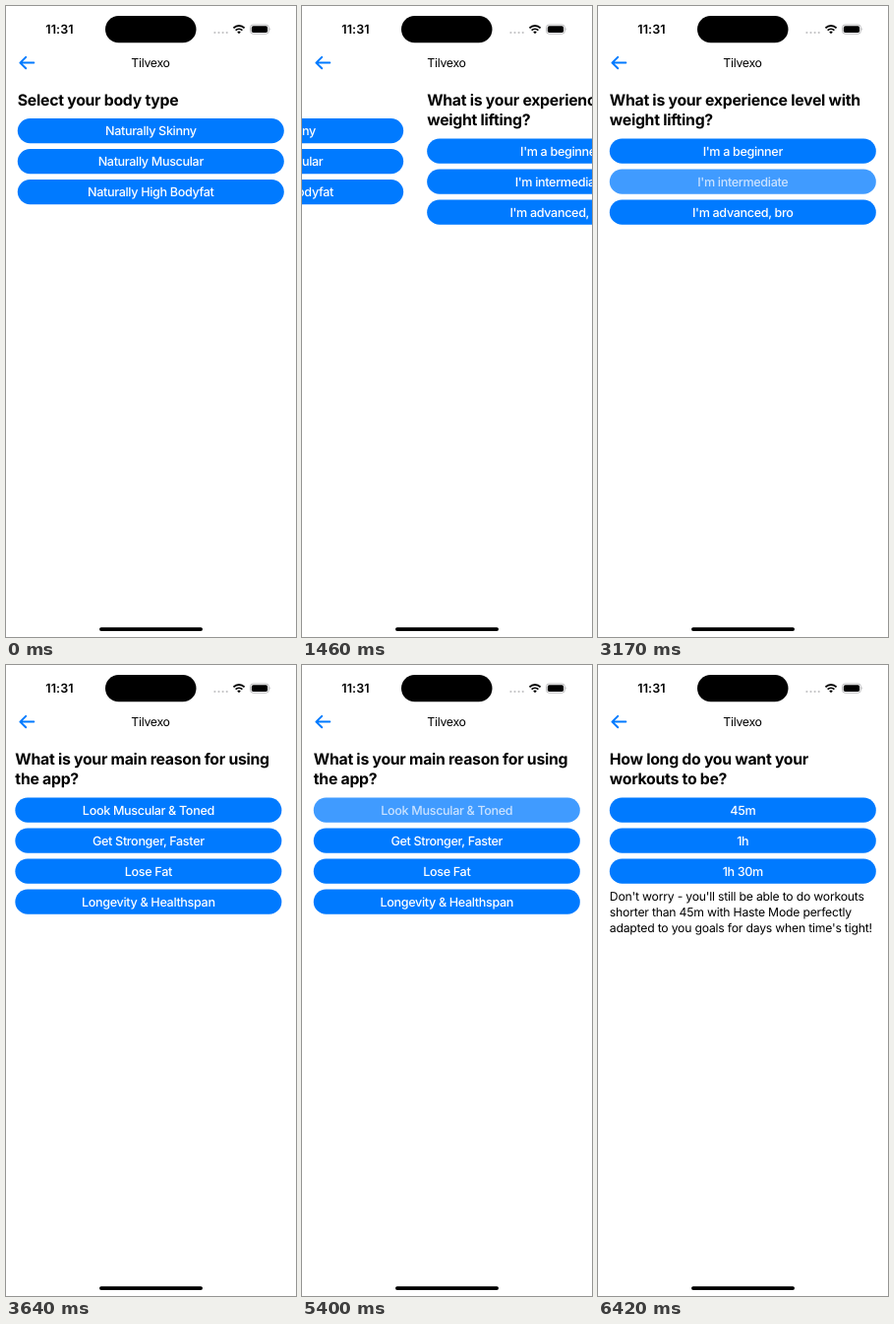
Recreate the animation shown at these times as an HTML page. Size 295 px wide and 640 px high, loop 7.29 s.

```html
<!DOCTYPE html>
<html lang="en">
<head>
<meta charset="utf-8">
<title>Workout setup</title>
<style>
  html, body { margin: 0; width: 100%; height: 100%; overflow: hidden; background: #fff; }
  svg { display: block; width: 100vw; height: 100vh; font-family: Inter, Roboto, sans-serif; text-rendering: geometricPrecision; }
  .mid { text-anchor: middle; }
  .clock { font-size: 12.6px; font-weight: 600; letter-spacing: .1px; }
  .brand { font-size: 12.3px; letter-spacing: -.28px; }
  .title { font-size: 15.8px; font-weight: 700; letter-spacing: -.27px; }
  .label { font-size: 12.6px; font-weight: 500; letter-spacing: -.34px; fill: #fff; }
  .note { font-size: 12.2px; letter-spacing: -.2px; }
  .button rect { fill: #007aff; }
  .button.down rect { fill: #409bff; }
  .button.down text { fill: #c9e2ff; }
</style>
</head>
<body>
<svg id="stage" viewBox="0 0 295 640">
  <rect width="295" height="640" fill="#fff"/>
  <g id="pages"></g>
  <text class="clock mid" x="54.5" y="28.3">11:31</text>
  <rect x="101" y="10" width="92.5" height="27.3" rx="13.65"/>
  <g fill="#c2c2c4">
    <circle cx="212.4" cy="27" r="1.1"/><circle cx="216.5" cy="27" r="1.1"/>
    <circle cx="220.6" cy="27" r="1.1"/><circle cx="224.7" cy="27" r="1.1"/>
  </g>
  <g fill="none" stroke="#000" stroke-width="1.8">
    <path d="M231.4 22.3A8 8 0 0 1 242.6 22.3"/>
    <path d="M233.6 24.7A4.9 4.9 0 0 1 240.4 24.7"/>
  </g>
  <path d="M235.2 26.3A2.6 2.6 0 0 1 238.8 26.3L237 28.2Z"/>
  <rect x="248.5" y="19" width="18.8" height="9.2" rx="2.8" fill="none" stroke="#b2b2b4" stroke-width=".9"/>
  <rect x="249.8" y="20.2" width="16.3" height="6.8" rx="1.8"/>
  <path d="M268.5 22.1Q270 23.6 268.5 25.1Z" fill="#b2b2b4"/>
  <path d="M28.3 57.6H14.6M20.2 51.9L14.4 57.6L20.2 63.3" fill="none" stroke="#007aff" stroke-width="2" stroke-linecap="round" stroke-linejoin="round"/>
  <text class="brand mid" x="147" y="62">Tilvexo</text>
  <rect x="95" y="630.2" width="105" height="3.8" rx="1.9"/>
</svg>
<script>
const W = 295, LOOP = 7290, LEFT = 11.8;

const PAGES = [
  { title: ["Select your body type"],
    options: ["Naturally Skinny", "Naturally Muscular", "Naturally High Bodyfat"] },
  { title: ["What is your experience level with", "weight lifting?"],
    options: ["I'm a beginner", "I'm intermediate", "I'm advanced, bro"] },
  { title: ["What is your main reason for using", "the app?"],
    options: ["Look Muscular & Toned", "Get Stronger, Faster", "Lose Fat", "Longevity & Healthspan"] },
  { title: ["How long do you want your", "workouts to be?"],
    options: ["45m", "1h", "1h 30m"],
    note: ["Don't worry - you'll still be able to do workouts",
           "shorter than 45m with Haste Mode perfectly",
           "adapted to you goals for days when time's tight!"] }
];

// Each tap: press time, pressed option, and the moments at which the slide is redrawn.
const TAPS = [
  { press: 1200, option: 1, steps: [1340, 1450, 1560, 1680, 1800, 1900, 2020] },
  { press: 3170, option: 1, steps: [3420, 3530, 3640, 3740, 3850, 3960, 4060] },
  { press: 5400, option: 0, steps: [5580, 5690, 5790, 5900, 6010, 6110, 6220] }
];

function add(parent, tag, attrs, text) {
  const el = document.createElementNS("http://www.w3.org/2000/svg", tag);
  for (const key in attrs) el.setAttribute(key, attrs[key]);
  if (text) el.textContent = text;
  parent.appendChild(el);
  return el;
}

function buildPage({ title, options, note = [] }) {
  const group = add(document.getElementById("pages"), "g", {});
  const top = 114 + (title.length - 1) * 20.6;
  title.forEach((line, i) => add(group, "text", { class: "title", x: LEFT, y: 100.8 + i * 20.6 }, line));
  const buttons = options.map((name, i) => {
    const y = top + i * 31;
    const button = add(group, "g", { class: "button" });
    add(button, "rect", { x: LEFT, y, width: 271, height: 25.2, rx: 12.6 });
    add(button, "text", { class: "label mid", x: LEFT + 135.5, y: y + 17.1 }, name);
    return button;
  });
  note.forEach((line, i) => add(group, "text", { class: "note", x: LEFT, y: 238.9 + i * 16.1 }, line));
  return { group, buttons };
}

const views = PAGES.map(buildPage);

// Remaining distance (1 to 0) of an underdamped spring after t seconds.
function spring(t) {
  const zeta = 0.7, omega = 15.33;
  const root = Math.sqrt(1 - zeta * zeta);
  const a = omega * root * t;
  return Math.exp(-zeta * omega * t) * (Math.cos(a) + zeta / root * Math.sin(a));
}

function slide(steps, t) {
  const passed = steps.filter(s => s <= t);
  if (!passed.length) return 0;
  if (passed.length === steps.length) return 1;
  return 1 - spring((passed[passed.length - 1] - steps[0]) / 1000);
}

function render(t) {
  const scroll = TAPS.reduce((sum, tap) => sum + slide(tap.steps, t), 0);
  views.forEach(({ group }, i) => {
    const x = (i - scroll) * W;
    group.setAttribute("transform", `translate(${x.toFixed(2)} 0)`);
    group.setAttribute("visibility", Math.abs(x) < W ? "visible" : "hidden");
  });
  TAPS.forEach(({ press, option, steps }, i) =>
    views[i].buttons[option].classList.toggle("down", t >= press && t < steps[0]));
}

const start = performance.now();
function tick() {
  render((performance.now() - start) % LOOP);
  requestAnimationFrame(tick);
}
tick();
</script>
</body>
</html>
```
